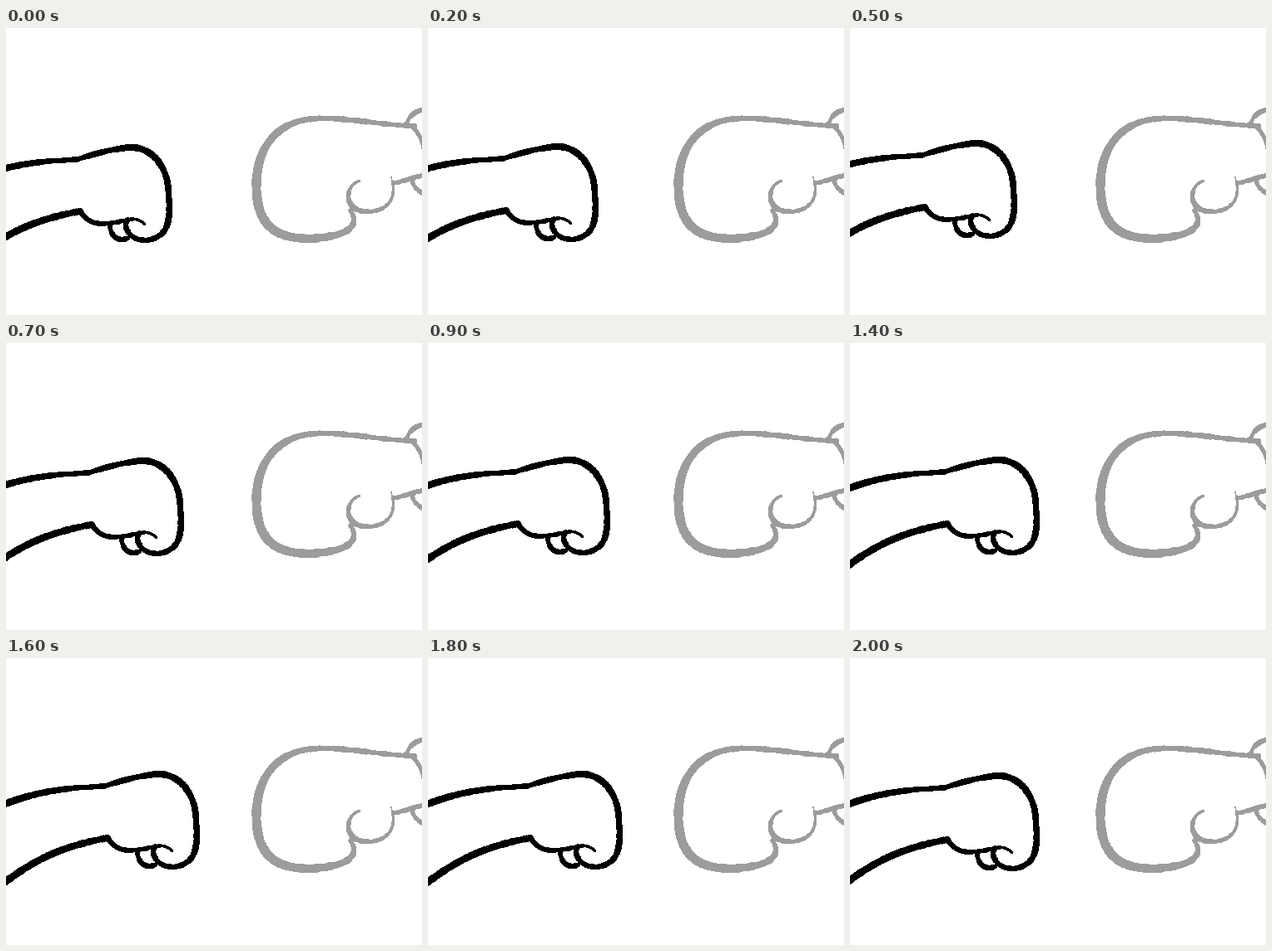
An HTML page with a canvas for the animation above (2.1 s loop, 500 px wide and 346 px high).

```html
<!DOCTYPE html>
<html lang="en">
<head>
<meta charset="utf-8">
<title>Fist and glove</title>
<style>
html, body { margin: 0; width: 100%; height: 100%; overflow: hidden; background: #fff; }
canvas { display: block; }
</style>
</head>
<body>
<canvas id="stage" width="500" height="346"></canvas>
<script>
const W = 500, H = 346, PAD = 60, STEP = 100;
const ROUNDS = 3, BEATS = 7, PUSH = 4, REACH = 6, ADVANCE = 14, LIFT = -1.7;
const ctx = document.getElementById('stage').getContext('2d');

let seed = 7;
function rand() {
  seed = (seed * 16807) % 2147483647;
  return seed / 2147483647 - 0.5;
}

const mix = (a, b, t) => a + (b - a) * t;

function bezier(a, b, c, d, t) {
  const u = 1 - t;
  return u * u * u * a + 3 * u * u * t * b + 3 * u * t * t * c + t * t * t * d;
}

// Rough marker line along joined cubic curves, with one radius per knot.
function brush(g, radii, path) {
  const pts = path.split(' ').map(p => p.split(',').map(Number));
  for (let i = 0; i + 3 < pts.length; i += 3) {
    const [a, b, c, d] = pts.slice(i, i + 4);
    const n = Math.ceil(Math.hypot(d[0] - a[0], d[1] - a[1]) * 1.3);
    let rough = 0;
    for (let k = 0; k <= n; k++) {
      const t = k / n;
      if (k % 4 === 0) rough = rand() * 0.8;
      const r = mix(radii[i / 3], radii[i / 3 + 1], t) + rough;
      g.beginPath();
      g.arc(bezier(a[0], b[0], c[0], d[0], t), bezier(a[1], b[1], c[1], d[1], t), Math.max(0.8, r), 0, 7);
      g.fill();
    }
  }
}

// Draws once, with hard pixel edges, in one grey shade.
function sprite(shade, draw) {
  const cv = document.createElement('canvas');
  cv.width = W + PAD;
  cv.height = H;
  const g = cv.getContext('2d');
  g.translate(PAD, 0);
  draw(g);
  const img = g.getImageData(0, 0, cv.width, H);
  for (let i = 0; i < img.data.length; i += 4) {
    img.data.fill(shade, i, i + 3);
    img.data[i + 3] = img.data[i + 3] > 127 ? 255 : 0;
  }
  g.putImageData(img, 0, 0);
  return cv;
}

const fist = sprite(0, g => {
  // arm
  brush(g, [4.2, 2.8], '-42,183 0,166 30,161 85,158.5');
  brush(g, [4.2, 3.8], '-42,280 0,248 30,232 89,221');
  // knuckles and curled finger
  brush(g, [2.8, 3.8, 3.6, 3.2, 2.8, 1.4],
    '84,159 104,152 133,144.5 150,144 172,144 188,160 194,185 197,210 200,243 183,251 168,261 146,255 144,238 143,228 160,228 167,237');
  // palm and little finger
  brush(g, [3, 2.6], '89,220 100,240 118,238 147,231');
  brush(g, [2.8, 2.8], '125,238 126,254 138,258 147,253');
});

const glove = sprite(156, g => {
  // mitt
  brush(g, [2.8, 3.2, 5.4, 5, 2.5],
    '491,118 452,117 412,108.5 380,109 330,108 301,140 301,190 301,236 322,254 365,254 405,252 428,241 414,220');
  // thumb
  brush(g, [1.5, 3.3, 1.2], '425,184 409,190 407,210 420,218 434,226 476,222 463,180');
  // wrist and cuff
  brush(g, [2.2, 3], '465,187 478,185 490,180 503,177');
  brush(g, [2.4, 3], '481,117 484,106 492,100 503,98');
  brush(g, [2.6, 2.3], '488,118 496,126 500,136 502,146');
  brush(g, [2.2, 2.6], '487,181 490,194 497,197 503,200');
});

// One shove: ease forward, then flick up and drop back.
function shove(beat) {
  if (beat <= PUSH) {
    return [REACH * (1 - (1 - beat / PUSH) ** 2), -Math.min(beat, 1)];
  }
  const left = BEATS - 1 - beat;
  return [left, 1 - REACH * left];
}

function frame() {
  const step = Math.floor(performance.now() / STEP) % (BEATS * ROUNDS);
  const round = Math.floor(step / BEATS);
  const [x, y] = shove(step % BEATS);
  ctx.fillStyle = '#fff';
  ctx.fillRect(0, 0, W, H);
  ctx.drawImage(glove, -PAD, 0);
  ctx.drawImage(fist, Math.round(x) + round * ADVANCE - PAD, y + Math.round(round * LIFT));
  requestAnimationFrame(frame);
}
frame();
</script>
</body>
</html>
```
